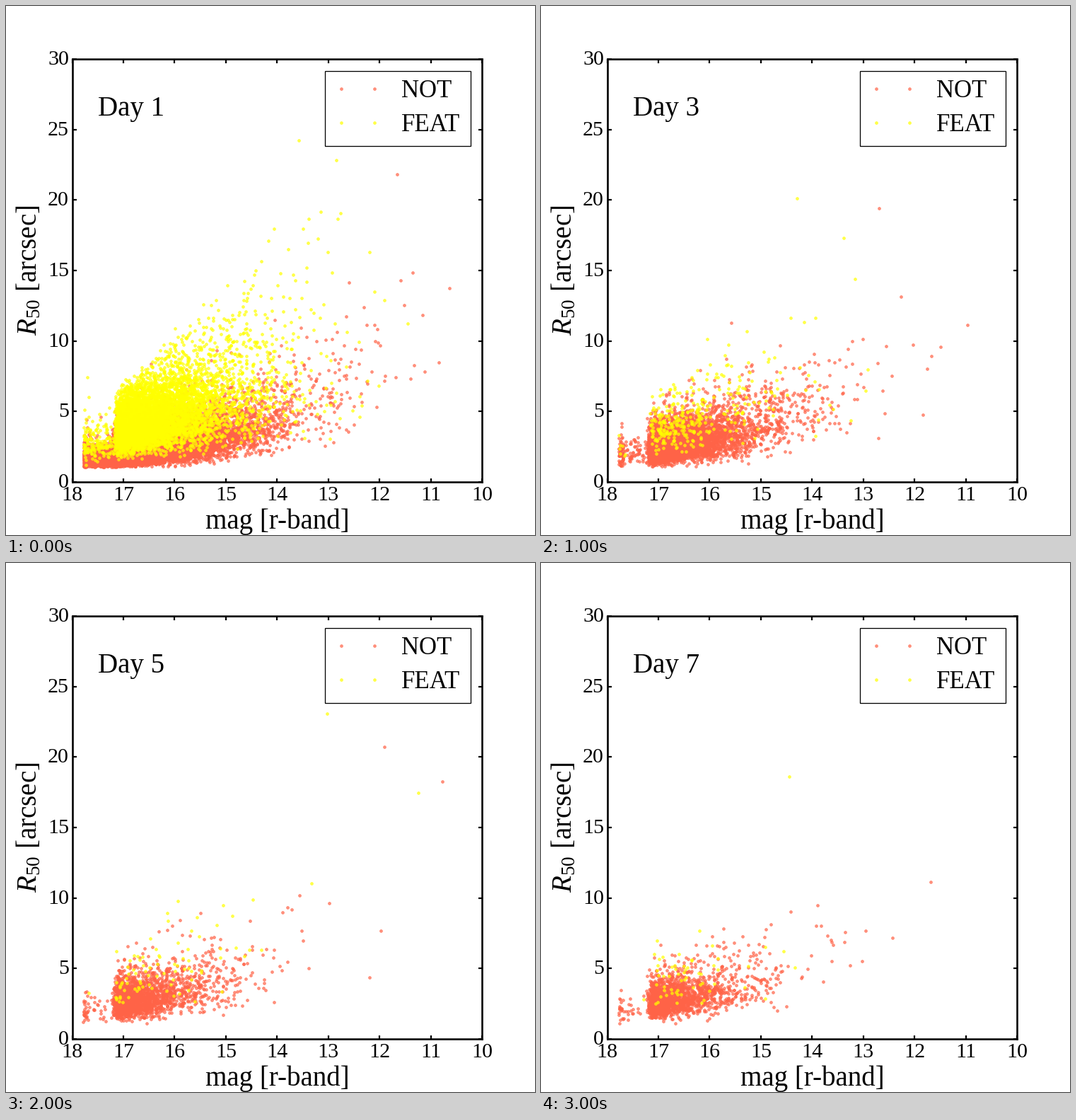
Animation of 748x748 px, one loop 3500 ms. Source, as a matplotlib script:

```python
import numpy as np
import matplotlib.pyplot as plt
from matplotlib.animation import FuncAnimation
from matplotlib.patches import Rectangle

SIZE, DPI = 748, 68
LEFT, WIDTH, BASE, HEIGHT = 0.125, 0.775, 0.1, 0.8
RED, YELLOW = "tomato", "yellow"
EDGE, LIMIT = 17.13, 17.78     # faint ends of the main sample and the strip

plt.rcParams.update({
    "font.family": "Liberation Serif",
    "mathtext.fontset": "custom",
    "mathtext.rm": "Liberation Serif",
    "mathtext.it": "Liberation Serif:italic",
})


def pt(px):
    return px * 72 / DPI


def strip(rng, n, median, packed):
    """Sparse points left of the main sample, some packed at the limit."""
    low = np.where(rng.random(n) < packed, LIMIT - 0.1, EDGE)
    radius = median * np.exp(0.25 * rng.normal(size=n))
    return rng.uniform(low, LIMIT), np.maximum(radius, 1.05 + 0.1 * rng.random(n))


def smooth(rng, n, scale, median):
    """Log-normal radii that grow towards bright magnitudes."""
    d = rng.exponential(scale, n)
    spread = 0.27 + 0.015 * d
    r = median * np.exp(0.2 * d + 0.015 * d**2 + spread * rng.normal(size=n))
    mag = EDGE - d + 0.045 * np.abs(rng.normal(size=n))
    keep = (r > 1.1) & (r < 15) & (mag > 10)
    return mag[keep], r[keep]


def featured(rng, n):
    """Larger radii with a steeper rise and a soft upper limit."""
    d = rng.gamma(1.2, 0.72, n)
    spread = 0.25 + 0.05 * d
    r = 3.8 * np.exp(0.22 * d + spread * rng.normal(size=n))
    mag = EDGE - d + 0.025 * np.abs(rng.normal(size=n))
    cap = 6.4 * np.exp(0.42 * d + 0.05 * rng.normal(size=n))
    keep = (r > 1.2) & (r < np.minimum(cap, 20)) & (mag > 10)
    return mag[keep], r[keep]


def join(*parts):
    return np.concatenate(parts, axis=1)


# Per day: red count, yellow count, red and yellow outliers (mag, radius)
DAYS = [
    (13000, 7000, [(11.66, 21.8)], [(13.58, 24.2), (12.85, 22.8)]),
    (9000, 720, [(10.6, 10.9)], [(11.4, 20.7)]),
    (5300, 330, [(12.7, 19.4)], [(14.29, 20.1)]),
    (2700, 140, [(12.93, 18.1), (11.91, 15.9)], [(13.04, 29.55)]),
    (1950, 85, [(11.91, 20.7), (10.78, 18.25)], [(13.03, 23.05)]),
    (2100, 105, [(14.41, 11.3)], [(13.62, 25.3), (13.54, 21.4), (14.23, 18.6)]),
    (1700, 60, [(11.68, 11.15)], [(14.45, 18.6)]),
]


def make_day(i):
    red_n, yellow_n, red_far, yellow_far = DAYS[i]
    rng = np.random.default_rng(40 + i)
    share, strip_median, packed = (0.025, 2.1, 0.45) if i else (0.075, 1.75, 0.1)
    scale = max(0.67, 0.82 - 0.04 * i)
    median = min(2.6, 2.1 + 0.17 * i)
    red = join(smooth(rng, red_n, scale, median),
               strip(rng, int(red_n * share), strip_median, packed),
               np.transpose(red_far))
    yellow = join(featured(rng, yellow_n),
                  strip(rng, int(yellow_n * 0.027), 2.8, 0.2),
                  np.transpose(yellow_far))
    return red, yellow


clouds = [make_day(i) for i in range(len(DAYS))]

fig = plt.figure(figsize=(SIZE / DPI, SIZE / DPI), dpi=DPI, facecolor="white")
ax = fig.add_axes([LEFT, BASE, WIDTH, HEIGHT])
ax.set(xlim=(18, 10), ylim=(0, 30),
       xticks=range(10, 19), yticks=range(0, 31, 5))
ax.tick_params(direction="in", length=pt(5.5), width=pt(2.2), top=True,
               right=True, labelbottom=False, labelleft=False)
for spine in ax.spines.values():
    spine.set_linewidth(pt(2.6))

# Overlay in pixel units for the texts and the legend
stage = fig.add_axes([0, 0, 1, 1])
stage.set(xlim=(0, SIZE), ylim=(SIZE, 0))
stage.axis("off")


def label(x, y, text, px, ha="left", **kw):
    return stage.text(x, y, text, fontsize=pt(px), ha=ha, va="baseline", **kw)


def dots(axes, color, x=(), y=()):
    return axes.plot(x, y, "o", color=color, ms=pt(3.9), mew=pt(0.65),
                     alpha=0.7)[0]


for mag in range(10, 19):
    x = SIZE * (LEFT + WIDTH * (18 - mag) / 8)
    label(x, 699, str(mag), 30, "center")
for r in range(0, 31, 5):
    y = SIZE * (1 - BASE - HEIGHT * r / 30)
    label(89, y + 8, str(r), 30, "right")
label(383.5, 739, "mag [r-band]", 39, "center")
label(43, 374, r"$R_{50}$ [arcsec]", 39, "center",
      rotation=90, rotation_mode="anchor")
day_text = label(130, 155, "", 39)

stage.add_patch(Rectangle((451, 91.6), 205.6, 106.4, fc="white", ec="black",
                          lw=pt(1.3)))
for name, color, y in (("NOT", RED, 117), ("FEAT", YELLOW, 165)):
    dots(stage, color, [474, 521], [y, y])
    label(559, y + 11.7, name, 34.7)

red_dots = dots(ax, RED)
yellow_dots = dots(ax, YELLOW)


def draw(i):
    red, yellow = clouds[i]
    red_dots.set_data(*red)
    yellow_dots.set_data(*yellow)
    day_text.set_text(f"Day {i + 1}")
    return red_dots, yellow_dots, day_text


anim = FuncAnimation(fig, draw, frames=len(DAYS), interval=500, repeat=True)
plt.show()
```
